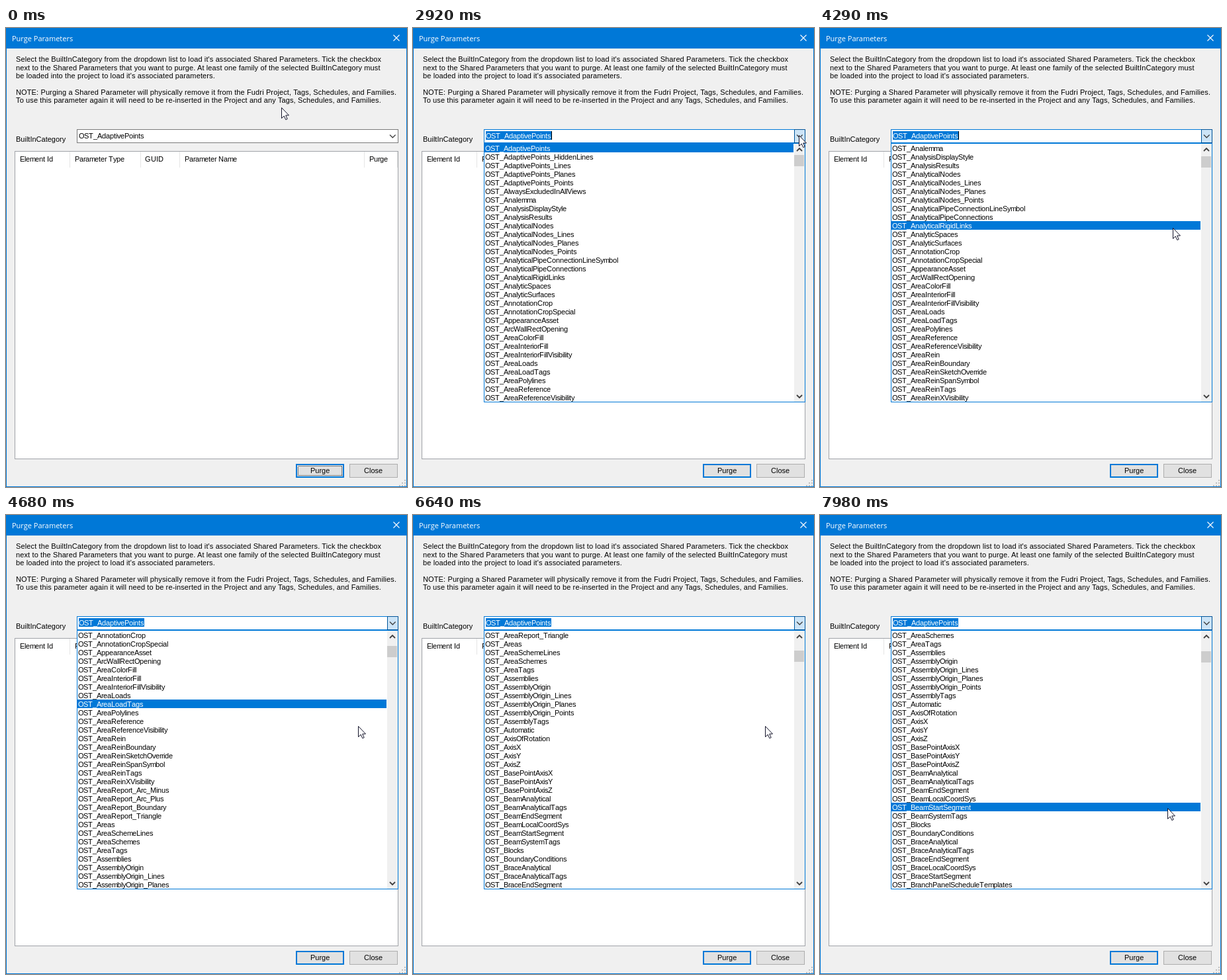
Write an HTML page that moves like this. It is 606 px wide and 694 px high and loops after 8000 ms.

```html
<!DOCTYPE html>
<html lang="en">
<head>
<meta charset="utf-8">
<title>Purge Parameters</title>
<style>
html, body { margin: 0; width: 100%; height: 100%; overflow: hidden; }
svg { display: block; font: 11px "Liberation Sans", Arial, sans-serif; }
rect { shape-rendering: crispEdges; }
.note { letter-spacing: .125px; }
.title { font: 11px "Open Sans", sans-serif; fill: #fff; }
.line { fill: none; stroke: #404040; stroke-width: 1.3; }
</style>
</head>
<body>
<svg width="606" height="694" viewBox="0 0 606 694">
  <rect width="606" height="694" fill="#0078d7"/>
  <rect x="1" y="31" width="604" height="662" fill="#f0f0f0"/>
  <text class="title" x="9" y="20">Purge Parameters</text>
  <path d="M585.5 10.5l9 9m0-9l-9 9" stroke="#fff" stroke-width="1.1"/>
  <g class="note">
    <text x="15" y="51">Select the BuiltInCategory from the dropdown list to load it's associated Shared Parameters. Tick the checkbox</text>
    <text x="15" y="64">next to the Shared Parameters that you want to purge. At least one family of the selected BuiltInCategory must</text>
    <text x="15" y="76">be loaded into the project to load it's associated parameters.</text>
    <text x="15" y="101">NOTE: Purging a Shared Parameter will physically remove it from the Fudri Project, Tags, Schedules, and Families.</text>
    <text x="15" y="113">To use this parameter again it will need to be re-inserted in the Project and any Tags, Schedules, and Families.</text>
  </g>
  <text x="15" y="172">BuiltInCategory</text>

  <rect x="13.5" y="186.5" width="579" height="465" fill="#fff" stroke="#a0a3a8"/>
  <g id="header"></g>

  <rect x="439" y="660" width="71" height="19" fill="#e1e1e1" stroke="#0078d7" stroke-width="2"/>
  <rect id="focus" x="441.5" y="662.5" width="66" height="14" fill="none" stroke="#222" stroke-dasharray="1 1"/>
  <text x="460" y="673">Purge</text>
  <rect x="519.5" y="659.5" width="72" height="20" fill="#e1e1e1" stroke="#adadad"/>
  <text x="541" y="673">Close</text>
  <path d="M603 683v10M599 687v6M595 691v2" stroke="#bfbfbf" stroke-width="2" stroke-dasharray="2 2"/>

  <rect id="box" x="107.5" y="153.5" width="485" height="20" fill="#fff"/>
  <rect id="button" x="576.5" y="153.5" width="16" height="20"/>
  <path class="line" d="M580 161.5l4.3 4.3 4.3-4.3"/>
  <rect id="selection" x="110" y="156" width="99" height="13" fill="#0078d7"/>
  <rect id="caret" x="209" y="156" width="1" height="13"/>
  <g id="value"></g>

  <clipPath id="drop"><rect id="dropArea" x="107" y="174" width="486" height="392"/></clipPath>
  <g id="list" clip-path="url(#drop)">
    <rect x="107.5" y="174.5" width="485" height="391" fill="#fff" stroke="#0078d7"/>
    <rect id="highlight" x="108" width="467" height="13" fill="#0078d7"/>
    <rect x="576" y="175" width="16" height="390" fill="#f0f0f0"/>
    <rect id="thumb" x="576" width="15" height="17" fill="#cdcdcd"/>
    <path class="line" style="stroke-width:1.8" d="M580 186l4-4 4 4M580 555l4 4 4-4"/>
    <g id="rows"></g>
  </g>
  <path id="cursor" d="M.5 .5V16.5L4.2 13 6.8 18.6 9.2 17.5 6.7 12H11.5Z" fill="#fff" stroke="#15152b"/>
</svg>
<script>
const $ = id => document.getElementById(id);
const NS = "http://www.w3.org/2000/svg";
const LOOP = 8000, OPEN = 2220, ROW = 13, TOP = 175, LEFT = 109;

// "stem:a|b|c" stands for the stem joined to each ending
const names = `AdaptivePoints:|_HiddenLines|_Lines|_Planes|_Points AlwaysExcludedInAllViews Analemma
Analysis:DisplayStyle|Results AnalyticalNodes:|_Lines|_Planes|_Points
Analytical:PipeConnectionLineSymbol|PipeConnections|RigidLinks Analytic:Spaces|Surfaces
AnnotationCrop:|Special AppearanceAsset ArcWallRectOpening
Area:ColorFill|InteriorFill|InteriorFillVisibility|Loads|LoadTags|Polylines|Reference|ReferenceVisibility
AreaRein:|Boundary|SketchOverride|SpanSymbol|Tags|XVisibility
AreaReport_:Arc_Minus|Arc_Plus|Boundary|Triangle Area:s|SchemeLines|Schemes|Tags
Assemblies AssemblyOrigin:|_Lines|_Planes|_Points AssemblyTags Automatic AxisOfRotation
Axis:X|Y|Z BasePointAxis:X|Y|Z
Beam:Analytical|AnalyticalTags|EndSegment|LocalCoordSys|StartSegment|SystemTags Blocks BoundaryConditions
Brace:Analytical|AnalyticalTags|EndSegment|LocalCoordSys|StartSegment BranchPanelScheduleTemplates`
  .split(/\s+/).flatMap(group => {
    const [stem, ends = ""] = group.split(":");
    return ends.split("|").map(end => "OST_" + stem + end);
  });

// Glyphs advance by whole pixels, as in classic screen text
const pen = document.createElement("canvas").getContext("2d");
pen.font = '11px "Liberation Sans", Arial, sans-serif';
const narrow = { r: 3, m: 8, O: 8 };
const advance = c => narrow[c] || Math.round(pen.measureText(c).width - .05);

function setText(el, text, x) {
  el.setAttribute("x", [...text].map(c => (x += advance(c)) - advance(c)).join(" "));
  el.textContent = text;
}

function addText(parent, text, x, y) {
  const el = parent.appendChild(document.createElementNS(NS, "text"));
  el.setAttribute("y", y);
  setText(el, text, x);
  return el;
}

function set(id, attrs) {
  for (const key in attrs) $(id).setAttribute(key, attrs[key]);
}
const show = (id, on) => set(id, { visibility: on ? "visible" : "hidden" });

for (const [text, x] of [["Element Id", 21], ["Parameter Type", 104], ["GUID", 210], ["Parameter Name", 270], ["Purge", 549]])
  addText($("header"), text, x, 202);
for (const x of [96, 203, 262, 541, 591]) {
  const rule = $("header").appendChild(document.createElementNS(NS, "rect"));
  for (const [k, v] of Object.entries({ x, y: 187, width: 1, height: 24, fill: "#e5e5e5" })) rule.setAttribute(k, v);
}
const value = addText($("value"), names[0], LEFT + 1, 167);
const rows = Array.from({ length: 30 }, (_, i) => addText($("rows"), "", 0, TOP + 11 + i * ROW));

// Pointer keys: time, x, y
const path = [[0, 416, 120], [870, 551, 141], [1200, 575, 154], [1750, 583, 161], [1840, 583, 162], [3010, 583, 162],
  [3880, 533, 285], [4600, 532, 319], [7420, 532, 319], [7980, 525, 443], [LOOP, 525, 443]];

function pointer(t) {
  const i = path.findIndex(key => key[0] > t);
  const [a, b] = [path[i - 1], path[i]];
  const p = (t - a[0]) / (b[0] - a[0]);
  return [1, 2].map(k => Math.round(a[k] + (b[k] - a[k]) * p));
}

// Each wheel notch scrolls three rows
const notches = [4050, 4210, 4360, 4480, 4600, 4680, 5380, 5540, 5700, 5780, 5930, 6170, 6490, 7040];
const scrollAt = t => 3 * notches.filter(n => n <= t).length;

function hovered(t, x, y) {
  if (t >= 4600 && t < 7500) return 26;
  if (t < 3090 || x > 575 || y < TOP) return 0;
  return scrollAt(t) + Math.floor((y - TOP) / ROW);
}

let lastScroll = -1;
function draw(t) {
  // the pointer is sampled about every 80 ms
  const tick = t >= 7980 ? 7980 : t < 70 ? 0 : 70 + Math.floor((t - 70) / 80) * 80;
  const [x, y] = pointer(t >= 1840 && t < 3090 ? 1840 : t >= 3880 && t < 3970 ? 3880 : tick);
  const open = t >= OPEN, over = !open && y >= 153, onButton = over && x > 576;
  set("cursor", { transform: `translate(${x} ${y})` });

  set("box", { stroke: open ? "#0078d7" : over ? "#171717" : "#7a7a7a" });
  set("button", { fill: open ? "#cce4f7" : "#e5f1fb", stroke: open ? "#005499" : "#0078d7" });
  show("button", open || onButton);
  show("focus", !open);
  show("selection", open);
  show("caret", t >= 2384 && Math.floor((t - 2384) / 532) % 2 === 1);
  value.setAttribute("fill", open ? "#fff" : "#000");

  show("list", t >= 2300);
  set("dropArea", { height: t < 2380 ? 196 : 392 });
  const scroll = scrollAt(t), row = hovered(t, x, y) - scroll;
  show("highlight", t >= 2300 && row >= 0);
  set("highlight", { y: TOP + row * ROW });
  set("thumb", { y: 192 + Math.round(scroll / 3) });
  if (scroll !== lastScroll) rows.forEach((el, i) => setText(el, names[scroll + i], LEFT));
  lastScroll = scroll;
  rows.forEach((el, i) => el.setAttribute("fill", i === row ? "#fff" : "#000"));
}

const start = performance.now();
function loop() {
  draw((performance.now() - start) % LOOP);
  requestAnimationFrame(loop);
}
loop();
</script>
</body>
</html>
```
